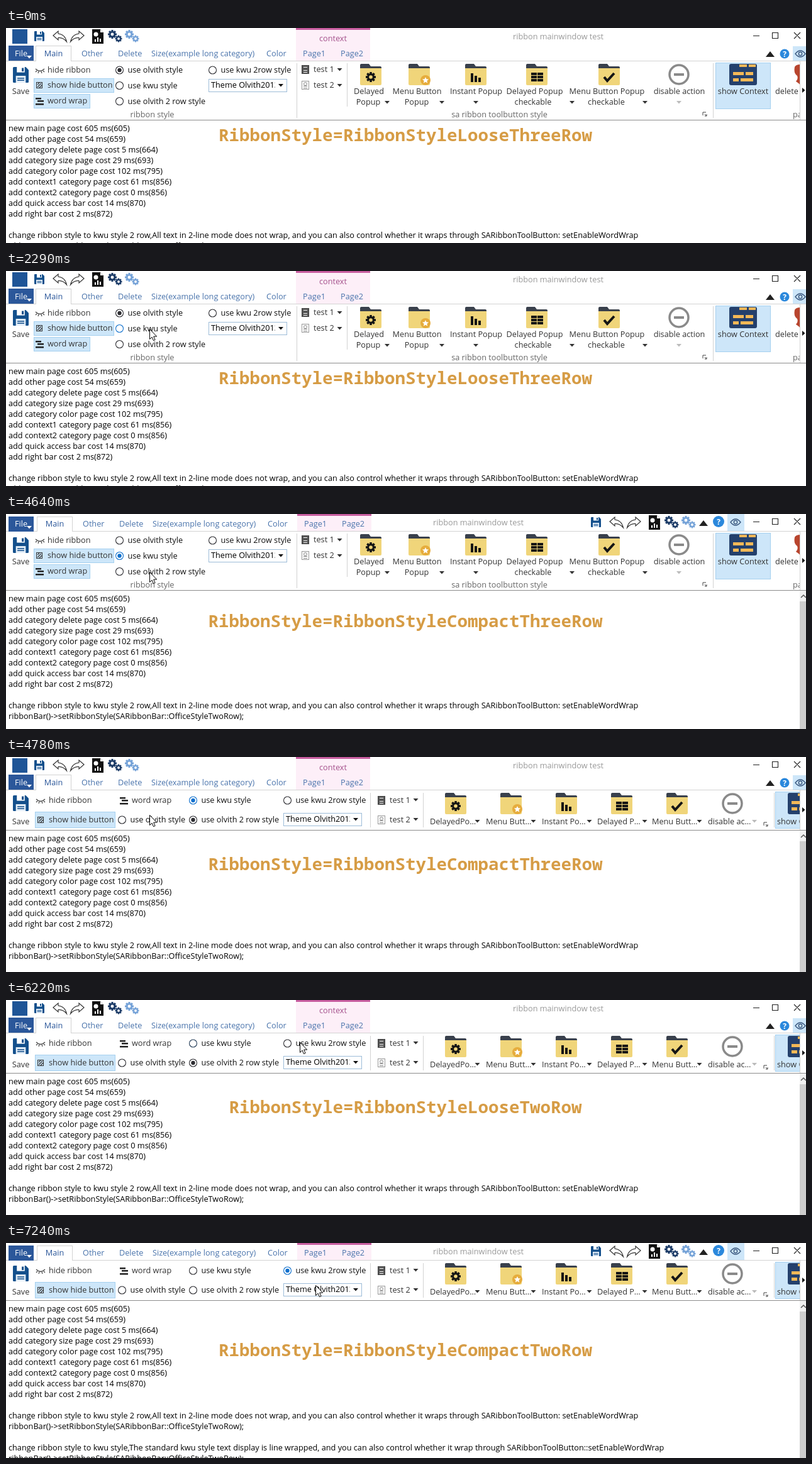
An HTML page with a canvas that plays this animation: 1272 by 342 pixels, repeating every 8 s.

```html
<!DOCTYPE html>
<html lang="en">
<head>
<meta charset="utf-8">
<title>Ribbon styles</title>
<style>
html, body { margin: 0; width: 100%; height: 100%; overflow: hidden; background: #fff; }
canvas { display: block; }
</style>
</head>
<body>
<canvas id="stage" width="1272" height="342"></canvas>
<script>
const ctx = document.getElementById('stage').getContext('2d');
const LOOP = 8000, W = 1272, H = 342;
const NAVY = '#1d3c68', BLUE = '#2b579a', INK = '#333', HILITE = '#cde6f9', EDGE = '#a5d0ef', RULE = '#d2d2d2';
const UI_FONT = '12.7px "Open Sans", "Noto Sans", sans-serif';
const TITLE_FONT = 'bold 27.5px "Noto Sans Mono", "DejaVu Sans Mono", monospace';
const LAYOUT_TIMES = [2360, 4780, 7040];
const FADE_ENDS = [2570, 4990, 7240];
const TITLES = ['LooseThreeRow', 'CompactThreeRow', 'LooseTwoRow', 'CompactTwoRow']
  .map(s => 'RibbonStyle=RibbonStyle' + s);
const SET_STYLE = 'ribbonBar()->setRibbonStyle(SARibbonBar::OfficeStyleTwoRow);';
const LOG = [
  'new main page cost 605 ms(605)', 'add other page cost 54 ms(659)',
  'add category delete page cost 5 ms(664)', 'add category size page cost 29 ms(693)',
  'add category color page cost 102 ms(795)', 'add context1 category page cost 61 ms(856)',
  'add context2 category page cost 0 ms(856)', 'add quick access bar cost 14 ms(870)',
  'add right bar cost 2 ms(872)', '',
  'change ribbon style to kwu style 2 row,All text in 2-line mode does not wrap, and you can also control whether it wraps through SARibbonToolButton: setEnableWordWrap',
  SET_STYLE, '',
  'change ribbon style to kwu style,The standard kwu style text display is line wrapped, and you can also control whether it wrap through SARibbonToolButton::setEnableWordWrap',
  SET_STYLE
];

// Progress from 0 to 1 that advances in n - 1 equal hops.
const hop = (t, a, b, n) =>
  t < a ? 0 : Math.min(1, Math.floor((t - a) / (b - a) * (n - 1) + 1e-6) / (n - 1));
const mix = (a, b, k) => a + (b - a) * k;

function box(x, y, w, h, fill, stroke) {
  if (fill) { ctx.fillStyle = fill; ctx.fillRect(x, y, w, h); }
  if (stroke) {
    ctx.strokeStyle = stroke; ctx.lineWidth = 1;
    ctx.strokeRect(x + .5, y + .5, w - 1, h - 1);
  }
}
function disc(x, y, r, fill, stroke, width = 1) {
  ctx.beginPath(); ctx.arc(x, y, r, 0, 7);
  if (fill) { ctx.fillStyle = fill; ctx.fill(); }
  if (stroke) { ctx.strokeStyle = stroke; ctx.lineWidth = width; ctx.stroke(); }
}
function shape(x, y, path, fill, stroke, width = 1) {
  ctx.save(); ctx.translate(x, y);
  const p = new Path2D(path);
  if (fill) { ctx.fillStyle = fill; ctx.fill(p); }
  if (stroke) { ctx.strokeStyle = stroke; ctx.lineWidth = width; ctx.stroke(p); }
  ctx.restore();
}
function label(text, x, y, color = INK, align = 'left') {
  ctx.font = UI_FONT; ctx.fillStyle = color; ctx.textAlign = align;
  ctx.fillText(text, x, y + 4);
}
const centered = (text, x, y, color) => label(text, x, y, color, 'center');
const dropArrow = (x, y, color = '#333') => shape(x, y, 'M-4-2h8L0 2.5z', color);
const vline = (x, y, h) => box(x, y, 1, h, RULE);

function gear(x, y, r, color, hole = '#fff') {
  ctx.save(); ctx.translate(x, y); ctx.fillStyle = color;
  for (let i = 0; i < 8; i++) {
    ctx.rotate(Math.PI / 4);
    ctx.fillRect(-r * .22, -r, r * .44, r);
  }
  ctx.restore();
  disc(x, y, r * .75, color);
  disc(x, y, r * .35, hole);
}
function gears(x, y, color) {
  gear(x + 7, y + 8, 7, color);
  gear(x + 17, y + 15, 5.5, color);
}
function floppy(x, y, s) {
  ctx.save(); ctx.translate(x, y); ctx.scale(s / 16, s / 16);
  shape(0, 0, 'M0 1q0-1 1-1h12l3 3v12q0 1-1 1H1q-1 0-1-1z', '#14508c');
  box(4, 0, 8, 5.5, '#fff'); box(9, 1, 2, 3.5, '#14508c');
  box(3, 9, 10, 7, '#e4eef8'); box(4.5, 11, 7, 1, '#14508c'); box(4.5, 13, 7, 1, '#14508c');
  ctx.restore();
}
function turnArrow(x, y, dir) {
  ctx.save(); ctx.translate(x, y); ctx.scale(dir, 1);
  shape(-11, -9, 'M0 7L8 0v4q11 1 13.5 13Q16 10 8 10.5V14z', '#fff', '#333', 1.2);
  ctx.restore();
}
function reportIcon(x, y) {
  shape(x, y, 'M0 0h13l5 5v18H0z', '#111');
  shape(x, y, 'M13 0v5h5z', '#fff');
  disc(x + 6, y + 8, 3.5, '#fff');
  [4, 7, 5].forEach((h, i) => box(x + 4 + i * 4, y + 20 - h, 2, h, '#fff'));
}
function helpIcon(x, y, r) {
  disc(x, y, r, '#2b88dc');
  ctx.font = 'bold 12px "Open Sans", sans-serif';
  ctx.fillStyle = '#fff'; ctx.textAlign = 'center';
  ctx.fillText('?', x, y + 4.5);
}
function eyeIcon(x, y) {
  shape(x, y, 'M-8 0Q0-10 8 0Q0 10-8 0z', null, '#3c5a80', 1.4);
  disc(x, y, 2.7, null, '#3c5a80', 1.4);
}
function pageIcon(x, y, dark) {
  box(x, y, 12, 14, dark ? '#555' : '#fff', dark ? '#444' : '#999');
  const c = dark ? '#fff' : '#888';
  if (!dark) disc(x + 6, y + 5, 2.5, null, c);
  else box(x + 3, y + 3, 6, 1, c);
  box(x + 3, y + 8, 6, 1, c); box(x + 3, y + 11, 6, 1, c);
}
const STAR = 'M0-5l1.5 3.3 3.6.3-2.8 2.4.9 3.5L0 2.7l-3.2 1.8.9-3.5-2.8-2.4 3.6-.3z';
function folder(cx, y, kind) {
  const x = cx - 17, dark = '#151515';
  shape(x, y, 'M0 2q0-2 2-2h12l3 4h15q2 0 2 2v4H0z', '#39404c');
  shape(x, y, 'M0 7h34v25q0 2-2 2H2q-2 0-2-2z', '#f0d57a');
  if (kind === 0) gear(cx, y + 21, 8, dark, '#f0d57a');
  if (kind === 1) { disc(cx + 10, y + 26, 8, '#e6ac3c'); shape(cx + 10, y + 26, STAR, '#fff'); }
  if (kind === 2) [14, 10, 7].forEach((h, i) => box(cx - 8 + i * 6, y + 29 - h, 4, h, dark));
  if (kind === 3) for (let i = 0; i < 6; i++)
    box(cx - 9 + (i % 2) * 10, y + 14 + (i >> 1) * 5, 9, 4, dark);
  if (kind === 4) shape(cx, y + 21, 'M-8 0l5 6L8-6', null, dark, 4);
}
function noEntry(x, y) {
  disc(x, y, 15, null, '#8a8a8a', 3.5);
  box(x - 8, y - 2, 16, 4, '#8a8a8a');
}
function panelIcon(x, y) {
  shape(x, y, 'M0 3q0-3 3-3h38q3 0 3 3v28q0 3-3 3H3q-3 0-3-3z', '#24406c');
  box(x + 16, y + 1, 12, 4, '#f3b857'); box(x + 31, y + 1, 11, 4, '#f3b857');
  box(x + 6, y + 13, 17, 5, '#f3b857'); box(x + 26, y + 13, 12, 5, '#f3b857');
  box(x + 6, y + 23, 9, 5, '#f3b857'); box(x + 18, y + 23, 20, 5, '#f3b857');
}
const lidIcon = (x, y) =>
  shape(x, y, 'M0-2Q7 5 14-2M2 1L0 3M5 2L4 5M9 2L10 5M12 1L14 3', null, '#444', 1.2);
function wrapIcon(x, y) {
  box(x, y - 5, 9, 2.5, '#222'); box(x + 3, y - 1, 10, 2.5, '#222'); box(x, y + 4, 13, 2.5, '#222');
}
function hideIcon(x, y) {
  box(x, y - 5, 10, 10, null, '#333');
  shape(x, y, 'M2 3L8-3M2-1L5-4M5 4L9 0', null, '#333', 1.2);
}
function radio(text, x, y, { on, hot }) {
  const color = `rgb(${mix(45, 15, hot)},${mix(45, 112, hot)},${mix(50, 205, hot)})`;
  disc(x, y, 6, '#fff', color, 1.1);
  ctx.globalAlpha = on; disc(x, y, 3.2, color); ctx.globalAlpha = 1;
  label(text, x + 13, y, '#111');
}
function combo(x, y) {
  box(x, y, 125, 21, '#fff', '#9dbcd8');
  ctx.save(); ctx.beginPath(); ctx.rect(x, y, 106, 21); ctx.clip();
  label('Theme Olvith2013', x + 4, y + 10, '#000');
  ctx.restore();
  dropArrow(x + 115, y + 10, '#111');
}
function launcher(x, y) {
  shape(x, y, 'M-3 2V-3H2M0 0L3 3M3 0V3H0', null, '#444', 1);
}

function windowButtons(y) {
  shape(0, y, 'M1188 .5h10M1218.5-4.5h9v9h-9zM1253-5l10 10M1263-5l-10 10', null, '#222', 1.1);
}
function header(compact) {
  const dx = compact ? 2 : 0, y = compact ? 16 : 41, bottom = compact ? 27 : 52;
  const top = compact ? 4 : 28;
  box(461 + dx, 0, 118, bottom, '#fdeff8');
  box(461 + dx, 0, 118, 3, '#c75d9f');
  box(0, bottom, W, 1, RULE);
  box(4, top, 40, 24, BLUE);
  label('File', 14, y, '#fff');
  dropArrow(37, y + 5, '#fff');
  box(47 + dx, top, 57, bottom - top + 1, '#fff', RULE);
  box(48 + dx, bottom, 55, 1, '#fff');
  centered('Main', 75.5 + dx, y, BLUE);
  [['Other', 120], ['Delete', 178], ['Size(example long category)', 231],
    ['Color', 414], ['Page1', 472], ['Page2', 532]].forEach(([s, x]) => label(s, x + dx, y, '#4a74ac'));
  centered('ribbon mainwindow test', compact ? 751 : 878, 14, '#999');
  windowButtons(12);
  if (compact) {
    floppy(930, 5, 16); turnArrow(971, 14, 1); turnArrow(998, 14, -1);
    reportIcon(1022, 2); gears(1047, 2, NAVY); gears(1074, 2, '#76a3d8');
    shape(1109, 14, 'M-7 5L0-4L7 5z', '#222');
    helpIcon(1133, 12, 9);
    box(1147, 0, 27, 27, HILITE); eyeIcon(1160, 13);
  } else {
    box(10, 2, 24, 23, '#1f5597');
    floppy(45, 5, 16); turnArrow(86, 14, 1); turnArrow(113, 14, -1);
    reportIcon(137, 2); gears(162, 2, NAVY); gears(189, 2, '#76a3d8');
    centered('context', 520, 17, '#a4508b');
    shape(1215, 42, 'M-7 4L0-5L7 4z', '#222');
    helpIcon(1238, 41, 7.5);
    box(1251, 29, 21, 23, HILITE); eyeIcon(1263, 41);
  }
}

function threeRows(r) {
  floppy(11, 62, 25); centered('Save', 23.5, 101);
  lidIcon(47, 67); label('hide ribbon', 66, 67);
  box(44, 80, 128, 23, HILITE, EDGE); hideIcon(48, 91); label('show hide button', 66, 91);
  box(44, 105, 90, 23, HILITE, EDGE); wrapIcon(47, 116); label('word wrap', 66, 116);
  radio('use olvith style', 180.5, 67, r.office);
  radio('use kwu style', 180.5, 91.5, r.alt);
  radio('use olvith 2 row style', 180.5, 116.5, r.officeTwo);
  radio('use kwu 2row style', 328.5, 67, r.altTwo);
  combo(322, 81);
  centered('ribbon style', 232.5, 138, '#666');
  vline(462, 56, 87);
  ['test 1', 'test 2'].forEach((s, i) => {
    pageIcon(470, 59 + 25 * i, !i); label(s, 489, 66 + 25 * i); dropArrow(530.5, 66 + 25 * i);
  });
  vline(542, 56, 69);
  [['Delayed', 'Popup', 577, 576, 580, 606], ['Menu Button', 'Popup', 653.5, 653, 657, 693],
    ['Instant Popup', '', 747.5, 0, 747, 747], ['Delayed Popup', 'checkable', 840.5, 838, 844, 900],
    ['Menu Button Popup', 'checkable', 955.5, 954.5, 959, 1016]
  ].forEach(([a, b, ax, bx, fx, arrow], i) => {
    folder(fx, 57, i); centered(a, ax, 101); centered(b, bx, 118); dropArrow(arrow, 118);
  });
  noEntry(1070, 74); centered('disable action', 1070.5, 101); dropArrow(1070, 118, '#bbb');
  centered('sa ribbon toolbutton style', 784.5, 138, '#666');
  launcher(1111, 137);
  vline(1124, 56, 87);
  box(1128, 55, 88, 74, HILITE, EDGE); panelIcon(1150, 57); centered('show Context', 1172, 101);
  shape(1253, 58, 'M1 4q2-4 10-4v34q-3-4-8-7q4-4 2-9q-6-4-4-14z', '#b8452e');
  label('delete', 1223, 101);
  label('pa', 1251, 138, '#666');
}
function twoRows(r) {
  floppy(11, 61, 25); centered('Save', 23.5, 103);
  lidIcon(48, 69); label('hide ribbon', 68, 69);
  box(46, 87, 128, 26, HILITE, EDGE); hideIcon(50, 100); label('show hide button', 68, 100);
  wrapIcon(181, 69); label('word wrap', 200, 69);
  radio('use olvith style', 184.5, 100, r.office);
  radio('use kwu style', 297.5, 69, r.alt);
  radio('use olvith 2 row style', 297.5, 100, r.officeTwo);
  radio('use kwu 2row style', 447.5, 69, r.altTwo);
  combo(441, 89);
  vline(579, 57, 55);
  ['test 1', 'test 2'].forEach((s, i) => {
    pageIcon(591, 62 + 31 * i, !i); label(s, 610, 69 + 31 * i); dropArrow(651.5, 68 + 31 * i);
  });
  vline(663, 57, 55);
  [['DelayedPo…', 674], ['Menu Butt…', 763], ['Instant Po…', 852], ['Delayed P…', 940],
    ['Menu Butt…', 1027]].forEach(([s, x], i) => {
    folder(715 + 88 * i, 57, i); label(s, x, 103); dropArrow(x + 75.5, 102);
  });
  noEntry(1155, 74); label('disable ac…', 1116, 103); dropArrow(1190, 102, '#bbb');
  launcher(1208, 107);
  vline(1221, 57, 55);
  box(1223, 55, 60, 59, HILITE, EDGE); panelIcon(1243, 57); label('show Context', 1226, 103);
}

function ribbon(layout, radios) {
  const bottom = layout < 2 ? 147 : 117;
  ctx.save();
  if (layout % 2) ctx.translate(0, -25);
  ctx.save();
  ctx.beginPath(); ctx.rect(0, 53, 1263, 100); ctx.clip();
  (layout < 2 ? threeRows : twoRows)(radios);
  ctx.restore();
  box(0, bottom - 1, W, 1, '#8c8c8c');
  vline(1262, 53, bottom - 54);
  shape(1266, (bottom + 51) / 2, 'M0-4L4.5 0L0 4z', '#111');
  LOG.forEach((line, i) => label(line, 4, bottom + 13 + 17 * i, '#000'));
  if (layout) {
    box(1262, bottom, 10, 260, '#f0f0f0');
    shape(1268, bottom + 9, 'M-4 2L0-2L4 2', null, '#555', 1.5);
    box(1262, bottom + 17, 10, 240, '#cdcdcd');
  }
  ctx.restore();
}

function radioStates(t, layout) {
  const gone = i => 1 - hop(t, LAYOUT_TIMES[i], FADE_ENDS[i], 4);
  const passing = hop(t, 5530, 5740, 4) - hop(t, 5950, 6230, 5);
  return {
    office: {
      on: gone(0),
      hot: layout === 2 ? hop(t, 4780, 4990, 4) - hop(t, 5390, 5600, 4) : 0
    },
    alt: {
      on: layout ? gone(1) : 0,
      hot: [hop(t, 1150, 1290, 3), 1, Math.max(gone(1), passing), 0][layout]
    },
    officeTwo: { on: layout < 2 ? 0 : gone(2), hot: layout === 1 ? hop(t, 4640, 4710, 2) : 0 },
    altTwo: { on: layout === 3 ? 1 : 0, hot: layout === 3 ? 1 : hop(t, 6220, 6500, 5) }
  };
}

function pointerAt(t) {
  if (t < 530) return null;
  if (t < 1420) {
    const k = 1 - (1 - hop(t, 530, 1290, 12)) ** 2;
    return [mix(600, 228, k), mix(301, 89, k)];
  }
  if (t < 6150) {
    const s = hop(t, 5320, 6150, 12), k = s * s * (3 - 2 * s), q = 1 - k;
    return [q * q * 228 + 2 * q * k * 310 + k * k * 457, q * q * 92 + 2 * q * k * 36 + k * k * 67];
  }
  const k = 1 - (1 - hop(t, 6150, 6500, 6)) ** 1.5;
  return [mix(457, 492, k), 67];
}

function bigTitle(text, alpha) {
  ctx.globalAlpha = alpha;
  ctx.font = TITLE_FONT; ctx.textAlign = 'center'; ctx.fillStyle = '#d69c45';
  ctx.fillText(text, 635, 179.5);
  ctx.globalAlpha = 1;
}

function draw(t) {
  const layout = LAYOUT_TIMES.filter(s => t >= s).length;
  box(0, 0, W, H, '#fff');
  header(layout % 2 === 1);
  ribbon(layout, radioStates(t, layout));
  const shown = layout ? hop(t, LAYOUT_TIMES[layout - 1], FADE_ENDS[layout - 1], 4) : 1;
  if (shown < 1) bigTitle(TITLES[layout - 1], 1 - shown);
  bigTitle(TITLES[layout], shown);
  const tip = pointerAt(t);
  if (tip) shape(Math.round(tip[0]) + .5, Math.round(tip[1]) + .5,
    'M0 0V16L3.6 12.6L6 18.2L8.6 17L6.2 11.6H11.2z', '#fff', '#000');
}

const start = performance.now();
function frame() {
  draw((performance.now() - start) % LOOP);
  requestAnimationFrame(frame);
}
frame();
</script>
</body>
</html>
```
